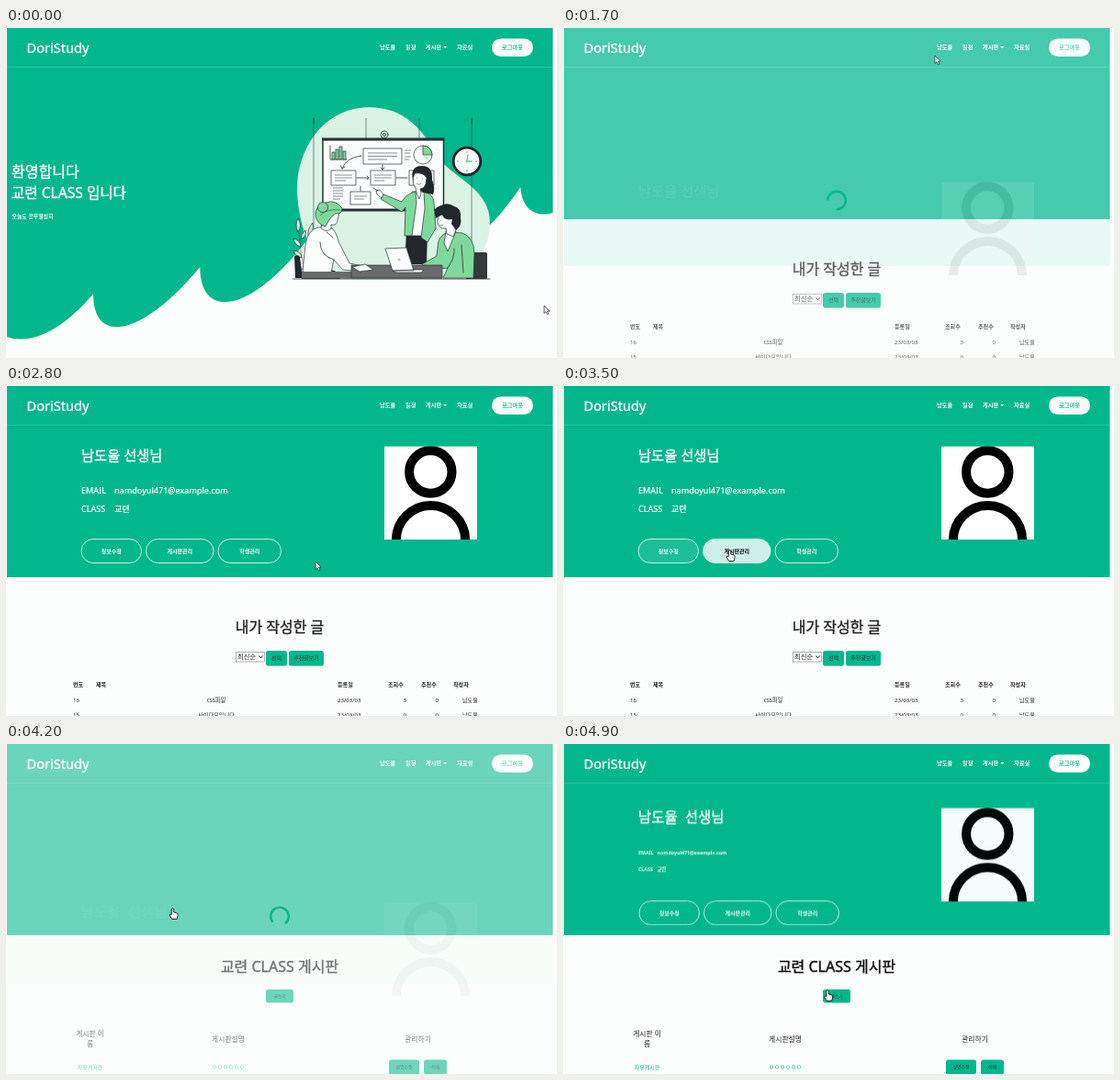
Animation, 600 px wide and 359 px high, one loop 5000 ms. Source, as an HTML page:

```html
<!DOCTYPE html>
<html lang="ko">
<head>
<meta charset="utf-8">
<title>DoriStudy</title>
<style>
html,body{margin:0;width:100%;height:100%;overflow:hidden;background:#fcfefd}
svg{display:block;width:100vw;height:100vh}
text{font-family:"Noto Sans","Noto Sans CJK KR","Noto Sans CJK",sans-serif;white-space:pre}
.ink{fill:none;stroke:#263238;stroke-width:.8;stroke-linejoin:round;stroke-linecap:round}
.thin{fill:none;stroke:#263238;stroke-width:.55}
.green{fill:#80d99c}.white{fill:#fcfefd}.dark{fill:#20282b}
.o{stroke:#263238;stroke-width:.7;stroke-linejoin:round}
</style>
</head>
<body>
<svg viewBox="0 0 600 359" preserveAspectRatio="none">
<defs>
  <clipPath id="heroClip"><rect id="heroClipBox" width="600" height="208"/></clipPath>
  <clipPath id="photoClip"><rect x="412" y="65.5" width="101" height="101.5"/></clipPath>
  <g id="photo" clip-path="url(#photoClip)">
    <rect x="412" y="65.5" width="101" height="101.5" fill="#fff"/>
    <g fill="none" stroke="#000" stroke-width="10">
      <circle cx="462.3" cy="93.5" r="23.2"/><circle cx="462.5" cy="167.5" r="37.6"/>
    </g>
  </g>
</defs>
<rect width="600" height="359" fill="#fcfefd"/>

<g id="home">
  <path id="wave" fill="#02b78c"/>
  <g id="welcome"></g>
  <path fill="#dbf3e4" d="M317 180C315 136 342 91 388 86.500C432 83 453 110 467 135C481 162 527 172 527 212C527 245 505 262 500 273H350C336 250 319 220 317 180Z"/>
  <path class="thin" d="M335 98V272M392 98V121M450 98V121M507 98V245"/>
  <path class="ink" d="M335 98v6M507 98v6"/>
  <!-- board -->
  <rect x="345" y="121.5" width="131.5" height="76.5" fill="#fafdfb" stroke="#263238" stroke-width="1.500"/>
  <path stroke="#263238" stroke-width="3" d="M344 121H477.500M344 198H477.500"/>
  <circle class="ink" cx="412" cy="116" r="4"/><circle class="ink" cx="412" cy="116" r="1.6"/>
  <path class="ink" d="M353 128V143H371"/>
  <path class="green o" d="M355 143V135h3V143ZM359 143V132h3V143ZM363 143V129h3V143ZM367 143V134h3V143Z"/>
  <g class="white o">
    <rect x="389" y="131" width="42" height="17"/><rect x="354" y="155" width="27" height="16"/>
    <rect x="397" y="155" width="27" height="16"/><rect x="439" y="155" width="27" height="16"/>
    <rect x="375" y="178" width="22" height="14"/>
  </g>
  <path class="thin" d="M394 136H426M394 139.500H426M394 143H415M358 160H377M358 163H377M358 166H370M401 160H420M401 163H420M401 166H412M379 183H393M379 186H390M356 174H367M356 177H367M356 180H367M356 183H367M356 186H364M434 133h7M434 136h6M434 140h7M434 143h5"/>
  <path class="ink" d="M387 139Q370 141 366 153m-1.500-3l1.500 3l3-2M410 149v5m-2-2l2 2l2-2M382 163h13m-2-2l2 2l-2 2M425 163h12M386 172v5"/>
  <circle class="white o" cx="454" cy="138" r="10"/>
  <path class="green o" d="M454 138V128A10 10 0 0 1 464 138Z"/>
  <path fill="none" stroke="#80d99c" d="M454 138L461 145"/>
  <!-- clock -->
  <circle cx="502" cy="145" r="14.800" fill="#fafdfb" stroke="#1d2528" stroke-width="2.800"/>
  <path class="thin" d="M502 145H508M502 145L503 137M502 134v2M502 154v2M491 145h2M511 145h2"/>
  <circle cx="502" cy="145" r="1.700" fill="#80d99c"/>
  <!-- plant and chairs -->
  <path class="thin" d="M326 268Q320 245 319 222M327 268Q329 235 331 218M326 268Q318 255 314 249"/>
  <g fill="#c9ead6" class="o">
    <path d="M318 222q-4-8 0-15q5 8 0 15ZM329 227q-1-9 5-15q2 10-5 15ZM321 238q-7-2-8-9q8 2 8 9ZM322 250q-7-1-9-8q9 1 9 8ZM329 242q1-8 7-11q0 9-7 11ZM321 230q0-6 5-10q2 7-5 10Z"/>
  </g>
  <path class="dark" d="M314 248q4-2 6 1l3 23h-8Z"/>
  <rect x="507" y="244" width="17" height="29" rx="1.500" fill="#373a3a"/>
  <path class="dark" d="M507 246v27h-6v-18Z"/>
  <!-- standing presenter -->
  <path class="dark" d="M436 222h23l-1 35h-24Z"/>
  <path class="white o" d="M442 178h14l2 48h-20Z"/>
  <path class="green o" d="M446 178Q436 180 431 189L411 181l-3 5l23 14L435 195L434 226h8L447 190ZM455 178Q466 181 466 190L468 218L459 233L452 228L456 196Z"/>
  <path class="dark" d="M444 170Q438 150 453 150Q465 150 464 165Q468 175 465 181L454 179Z"/>
  <path class="white o" d="M445 158Q455 157 458 163L457 170Q455 175 451 175L452 180L450 186L447 179L446 174Q441 168 445 158ZM411 181l-4-5l-4 1l1 4l5 4Z"/>
  <path d="M447 169q3 3 5 0M447 163h1M453 164h1" class="thin"/>
  <path class="ink" stroke-width="1.600" d="M400 174l5 3"/>
  <!-- left listener -->
  <path class="dark" d="M324 258q15 4 34 6l6 9H322Z"/>
  <path class="white o" d="M340 217Q328 220 326 236L323 265L353 271L357 252L367 263L396 266L398 261L374 256L362 232Q359 219 353 217Z"/>
  <path class="ink" d="M342 233Q342 248 357 252M349 222l7 6"/>
  <path class="white o" d="M345 207l-2 11q7 5 11 0v-4q7 1 7-5l2-8l-8-7Z"/>
  <path class="green o" d="M337 205Q336 193 348 190Q359 186 366 196Q366 203 359 202Q353 205 348 216Q340 214 337 205Z"/>
  <circle class="green o" cx="345" cy="195" r="5.500"/>
  <path class="thin" d="M342 204Q350 196 364 198"/>
  <!-- right listener -->
  <path class="green o" d="M481 222Q470 226 470 239L469 248L453 257L457 264L481 261L476 272H509L510 246Q510 228 497 223Z"/>
  <path class="white o" d="M479 221h11l-9 22l-4-9ZM457 258l-9 2v4l10 0Z"/>
  <path class="ink" d="M488 240Q489 250 481 261M496 236l2 30"/>
  <path class="white o" d="M471 203L470 211Q471 219 479 218L480 224L487 227L491 217L492 204Z"/>
  <path class="dark" d="M468 207Q464 195 474 193Q481 189 488 194Q496 196 495 206Q497 215 490 220L485 213L486 208Q477 210 475 203Z"/>
  <path class="thin" d="M472 214q2 2 4 0M473 209h1"/>
  <!-- table -->
  <rect x="322" y="265" width="153" height="7.500" fill="#6a6b6a"/>
  <rect x="376" y="258" width="99" height="14" fill="#6a6b6a" class="o"/>
  <path class="white o" d="M377 260l14-3l9 6l-15 2ZM413 240l23-1l8 25h-23ZM421 264l23-1h11l-3 3h-27Z"/>
  <circle cx="428" cy="252" r="1.500" fill="#b8c4bd"/>
  <path class="ink" d="M312 273H527"/>
</g>

<g id="inner">
  <rect x="1" width="594.5" height="208" fill="#02b78c"/>
  <rect id="strip" x="1" y="208" width="594.5" fill="#02b78c"/>
  <g id="profile"></g>
  <g id="board"></g>
</g>

<g id="nav"></g>
<rect id="veil" width="600" height="359" fill="#fcfefd"/>
<circle id="spinner" cx="298" cy="187.500" r="9.800" fill="none" stroke="#02b78c" stroke-width="2.400" stroke-dasharray="46.200 15.400"/>
<path id="arrow" d="M0 0V8.500L2 6.700L3.400 9.800L4.900 9.100L3.500 6.200H6Z" fill="#fff" stroke="#222" stroke-width=".7"/>
<path id="hand" d="M-1.200 1Q0-1 1.200 1V4.500L4.600 5.400Q5.900 6 5.600 8L4.600 12H-.8L-3.400 7.500Q-3.400 5.800-1.200 7Z" fill="#fff" stroke="#111" stroke-width=".9"/>
</svg>

<script>
const LOOP = 5000, STEP = 100;
const GREEN = '#02b78c', WHITE = '#fff', INK = '#222';
const TEACHER = '남도율', MAIL = 'namdoyul471@example.com';
const $ = id => document.getElementById(id);
const lerp = (a, b, k) => a + (b - a) * k;
const clamp = v => Math.max(0, Math.min(1, v));

// Text placed by its vertical middle; weight 500 gets a fine outline for a medium look.
const text = (x, y, size, str, fill = INK, weight = 400, anchor = 'start') =>
  `<text x="${x}" y="${y}" dy=".37em" font-size="${size}" fill="${fill}" font-weight="${weight}" text-anchor="${anchor}"` +
  (weight === 500 ? ` stroke="${fill}" stroke-width="${size * .025}"` : '') + `>${str}</text>`;
const mid = (x, y, size, str, fill, weight) => text(x, y, size, str, fill, weight, 'middle');
const button = (x, y, w, h, label, size) =>
  `<rect x="${x}" y="${y}" width="${w}" height="${h}" rx="2.800" fill="${GREEN}"/>` + mid(x + w / 2, y + h / 2, size, label, '#06382c');
const pill = (x, w, label, i) =>
  `<rect id="pill${i}" x="${x}" y="166.500" width="${w}" height="26" rx="13" fill="#fff" fill-opacity="0" stroke="#d9f4ec" stroke-width=".9"/>
   <g id="pillText${i}">${mid(x + w / 2, 179.5, 6, label, WHITE, 700)}</g>`;

function wavePath() {
  const cusp = i => [95 + 116.3 * i, 289 - 29 * i];
  let d = 'M1 0V336C30 346 65 325 95 289';
  for (let i = 0; i < 4; i++) {
    const [x, y] = cusp(i), [nx, ny] = cusp(i + 1);
    d += `C${x} ${y + 58} ${x + 55} ${y + 45 + 6 * i} ${nx} ${ny}`;
  }
  return d + 'C562 200 580 206 595.5 201V0Z';
}

function welcomeMarkup() {
  return text(6, 156.5, 16, '환영합니다', WHITE, 500) +
    text(6, 179, 15.6, '교련 CLASS 입니다', WHITE, 500) +
    text(6.5, 205, 5.9, '오늘도 공부열심히', WHITE, 700);
}

function navMarkup() {
  return '<path d="M1 42.500H595.500" stroke="#fff" stroke-opacity=".15"/>' +
    text(22.5, 21.5, 14.6, 'DoriStudy', WHITE, 500) +
    [[407, TEACHER], [435, '일정'], [457, '게시판'], [491, '자료실']]
      .map(([x, s]) => text(x, 21, 6.2, s, WHITE, 700)).join('') +
    '<path d="M476.300 20h4l-2 2.200Z" fill="#fff"/>' +
    '<rect x="529" y="11.500" width="45" height="19.500" rx="9.750" fill="#f8fbfa"/>' +
    mid(551.5, 21.2, 6.2, '로그아웃', GREEN, 500) +
    '<rect id="underline" x="407" y="41.300" height="1.600" fill="#fff"/>';
}

function profileMarkup(small) {
  const size = small ? 5.3 : 9.1, x = small ? 102.5 : 118;
  const y1 = small ? 114.5 : 113.5, y2 = small ? 132.5 : 133.5, weight = small ? 700 : 500;
  return `<g clip-path="url(#heroClip)"><g class="rise">
    ${text(82, 75, small ? 15.5 : 15.3, TEACHER + (small ? '  ' : ' ') + '선생님', WHITE, 500)}
    ${text(82, y1, size, 'EMAIL', WHITE, weight)}${text(x, y1, size, MAIL, WHITE, weight)}
    ${text(82, y2, size, 'CLASS', WHITE, weight)}${text(x, y2, size, '교련', WHITE, weight)}
    <use href="#photo"/>
    <g id="pills">${pill(82, 65.5, '정보수정', 0)}${pill(152.5, 73.5, '게시판관리', 1)}${pill(231, 68.5, '학생관리', 2)}</g>
  </g></g>`;
}

function postsMarkup() {
  const row = (y, no, size, title, views) =>
    text(73, y, 6.1, no) + mid(229, y, size, title) + text(361, y, 6.1, '23/03/03') +
    text(436, y, 6.1, views, INK, 400, 'end') + text(471, y, 6.1, '0', INK, 400, 'end') + text(497, y, 6.1, TEACHER);
  return mid(298, 262, 16, '내가 작성한 글', INK, 500) +
    '<rect x="250.300" y="289.500" width="31" height="10.500" fill="#fff" stroke="#888" stroke-width=".7"/>' +
    text(252, 294.6, 7.3, '최신순') +
    '<path d="M275.500 293.500l2 2.300l2-2.300" fill="none" stroke="#111"/>' +
    button(283, 288, 23, 16.5, '선택', 6) + button(308, 288, 38, 16.5, '추천글보기', 6) +
    [[73, '번호'], [98, '제목'], [361, '등록일'], [416, '조회수'], [452, '추천수'], [487, '작성자']]
      .map(([x, s]) => text(x, 325, 6.1, s, INK, 700)).join('') +
    row(342, '16', 6.3, 'css파일', '3') + row(358, '15', 6.2, '사이다모입니다', '0');
}

function listMarkup() {
  return mid(298, 242, 16, '교련 CLASS 게시판', '#111', 500) + button(283, 267, 30, 14.5, '글쓰기', 4.8) +
    mid(91.5, 315, 7.8, '게시판 이') + mid(91.5, 326, 7.8, '름') +
    mid(242, 321, 7.8, '게시판설명') + mid(448.5, 321, 7.8, '관리하기') +
    mid(91.5, 351.5, 6, '자유게시판', GREEN) + mid(242, 351.5, 6.5, 'ㅇㅇㅇㅇㅇㅇ', GREEN) +
    button(417, 343.5, 33, 16, '설명수정', 4.9) + button(455, 343.5, 25, 16, '삭제', 4.9);
}

// Pointer stops: time, x, y.
const STOPS = [[0, 586, 302], [600, 468, 252], [800, 409, 27], [900, 409, 27], [1000, 410, 24], [1200, 411.5, 21],
  [1300, 411.5, 21], [1400, 405, 30], [1700, 405, 30], [2200, 337, 191], [2800, 337, 191], [3300, 122, 182],
  [3500, 181.5, 178.5], [4600, 181.5, 178.5], [4900, 288, 267.5]];

function pointerAt(t) {
  const i = Math.max(1, STOPS.findIndex(s => s[0] >= t));
  const a = STOPS[i - 1], b = STOPS[i], k = clamp((t - a[0]) / (b[0] - a[0]));
  return [lerp(a[1], b[1], k), lerp(a[2], b[2], k)];
}

function setHover(i, amount) {
  $('pill' + i).setAttribute('fill-opacity', amount);
  const shade = Math.round(255 * (1 - clamp((amount - .1) * 1.4)));
  $('pillText' + i).firstElementChild.setAttribute('fill', `rgb(${shade},${shade},${shade})`);
}

let shown = -1;
function showPage(page) {
  if (page === shown) return;
  shown = page;
  $('home').style.display = page ? 'none' : '';
  $('inner').style.display = page ? '' : 'none';
  if (!page) return;
  $('profile').innerHTML = profileMarkup(page === 2);
  $('board').innerHTML = page === 1 ? postsMarkup() : listMarkup();
}

// Moves the inner page to time t and returns how much the loading veil covers it.
function drawInner(page, t) {
  const k = page === 1 ? .165 + (t - 1700) * .000932 : .097 + (t - 4200) * .00112;
  const s = clamp(k), p = s * s * (3 - 2 * s), drop = 110 * (1 - p);
  const loading = page === 1 && t < 1700;
  const veil = loading ? 1 : clamp(.634 - 2.2 * k);
  const rise = document.querySelector('.rise');
  rise.setAttribute('transform', `translate(0 ${drop})`);
  rise.setAttribute('opacity', lerp(.03, 1, p));
  $('pills').setAttribute('transform', `translate(${drop * .22} 0)`);
  $('heroClipBox').setAttribute('height', veil > 0 ? 276 : 208);
  $('pills').style.display = veil > 0 ? 'none' : '';
  $('strip').setAttribute('height', veil > 0 ? drop * .5 : 0);
  $('strip').setAttribute('opacity', page === 1 ? .1 : .03);
  if (page === 1) {
    const leaving = clamp((3520 - t) / 200), entering = clamp((t - 3340) / 200);
    setHover(0, t < 3300 ? 0 : leaving);
    setHover(1, entering);
  }
  return veil;
}

function render(ms) {
  const t = Math.floor((ms % LOOP) / STEP) * STEP;
  const page = t < 1400 ? 0 : t < 4100 ? 1 : 2;
  showPage(page);
  const veil = page ? drawInner(page, t) : 0;
  $('veil').setAttribute('opacity', veil);
  $('spinner').setAttribute('opacity', clamp(veil * 4));
  const gap = page === 1 ? 135 + (Math.max(t, 1600) - 1700) * .36 : 95 + (t - 4200) * .36;
  $('spinner').setAttribute('transform', `rotate(${gap + 45} 298 187.5)`);
  $('underline').setAttribute('width', page ? 0 : 17 * clamp((t - 900) / 300));
  const [x, y] = pointerAt(t);
  const onLink = (t >= 1000 && t < 1400) || (t >= 3300 && t < 4700) || t >= 4900;
  for (const id of ['arrow', 'hand']) {
    $(id).setAttribute('transform', `translate(${x} ${y})`);
    $(id).style.display = (id === 'hand') === onLink ? '' : 'none';
  }
}

$('wave').setAttribute('d', wavePath());
$('welcome').innerHTML = welcomeMarkup();
$('nav').innerHTML = navMarkup();
const start = performance.now();
function tick() {
  render(performance.now() - start);
  requestAnimationFrame(tick);
}
tick();
</script>
</body>
</html>
```
